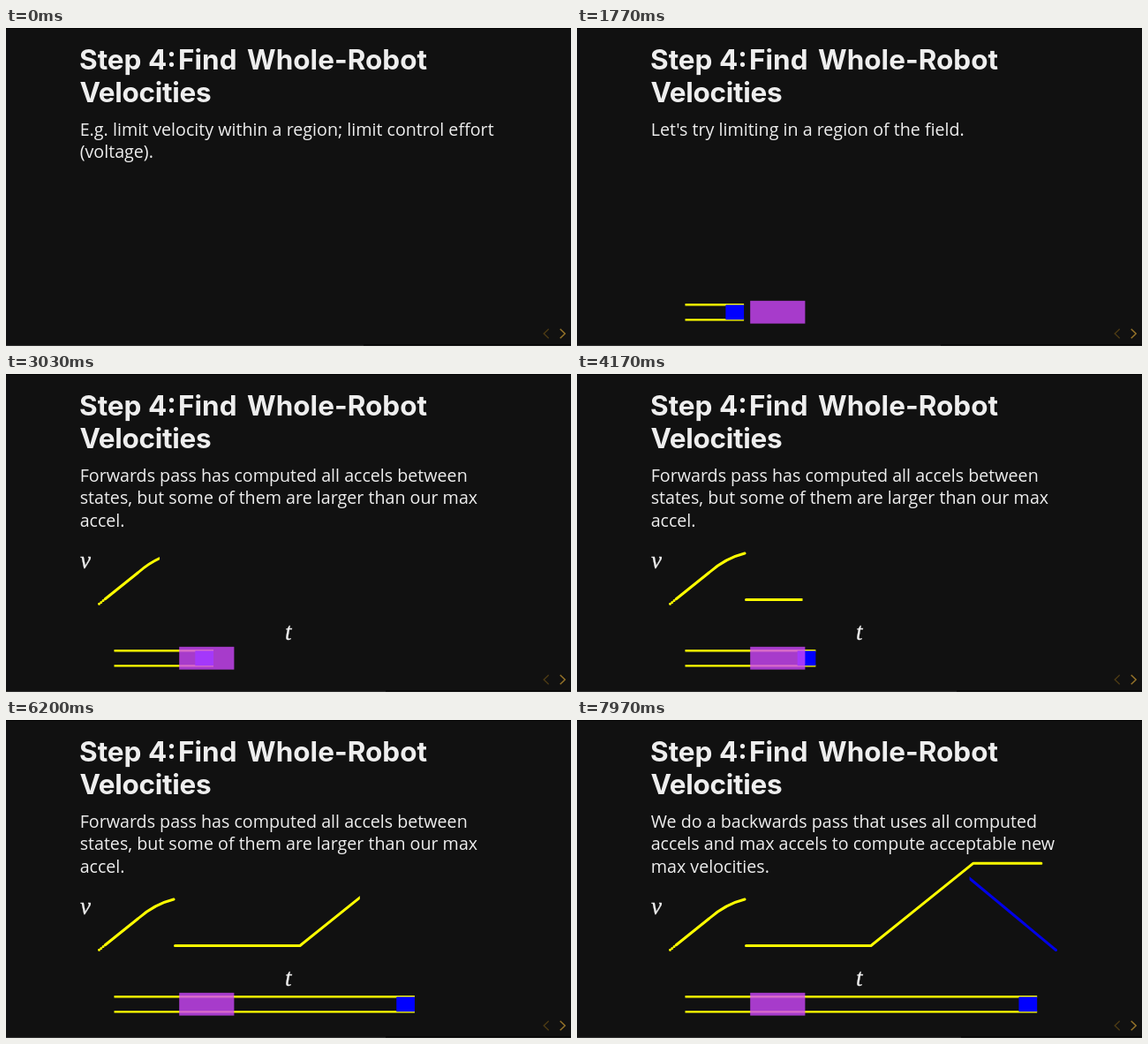
Recreate the animation shown at these times as an HTML page. Size 640 px wide and 360 px high, loop 8000 ms.

```html
<!DOCTYPE html>
<html lang="en">
<head>
<meta charset="utf-8">
<style>
  html, body { margin: 0; width: 100%; height: 100%; overflow: hidden; background: #111; }
  svg { display: block; width: 640px; height: 360px; }
  .title { font: 700 31.5px Inter, sans-serif; fill: #eee; }
  .body { font: 19.66px "Open Sans", sans-serif; fill: #eee; }
  .math { font: italic 27px "Liberation Serif", serif; fill: #eee; stroke: #eee; stroke-width: .3; }
  .sub { font-size: 18px; letter-spacing: 1.2px; }
  .line { fill: none; stroke: #ff0; stroke-width: 3; stroke-linecap: round; stroke-linejoin: round; }
</style>
</head>
<body>
<svg viewBox="0 0 640 360">
  <defs>
    <clipPath id="forwardClip"><rect id="forward" x="100" y="150" height="120"/></clipPath>
    <clipPath id="backwardClip"><rect id="backward" y="150" height="120"/></clipPath>
  </defs>
  <rect width="640" height="360" fill="#111"/>
  <rect width="640" height="1" fill="#050505"/>
  <rect y="359" width="640" height="1" fill="#333"/>
  <rect id="remaining" y="358" width="640" height="1.5" fill="#060606"/>

  <g class="title">
    <text y="47"><tspan x="83">Step</tspan> <tspan x="161">4:</tspan>
      <tspan x="195">Find</tspan> <tspan x="273">Whole-Robot</tspan></text>
    <text x="83.5" y="84" letter-spacing="-.3">Velocities</text>
  </g>

  <g id="slides" class="body"></g>

  <g id="formula" class="math">
    <text x="84" y="148.2" letter-spacing="2">min</text>
    <text x="130" y="148.2" font-style="normal">(</text>
    <text x="139" y="148.2">v</text><text class="sub" x="151.5" y="151.6">usermax</text>
    <text x="224" y="148.2">,</text>
    <text x="235" y="148.2">v</text><text class="sub" x="247" y="151.6">accelmax</text>
    <text x="322.5" y="148.2">,</text>
    <text x="333" y="148.2">v</text><text class="sub" x="345" y="151.6">constraintmax</text>
    <text x="465" y="148.2" font-style="normal">)</text>
    <text class="body" x="474.5" y="148.2" stroke="none">.</text>
  </g>

  <g id="graph">
    <text class="math" x="84" y="219.5">v</text>
    <text class="math" x="316" y="301">t</text>
    <g class="line" clip-path="url(#forwardClip)">
      <path d="M105.5 260.2L150 224.5Q168 208.5 190 203" stroke-dasharray="0 2.9 0 2.9 0 2.9 999"/>
      <path d="M191.5 255.5H333L449 162.2H526"/>
    </g>
    <path class="line" clip-path="url(#backwardClip)" style="stroke:#0000e8" d="M542.5 260.5L440 175.5"/>
  </g>

  <g id="field">
    <path id="tracks" class="line" style="stroke-width:2.4;stroke-linecap:butt"/>
    <rect id="robot" y="313.4" width="20.7" height="16.8" fill="#00f"/>
    <rect x="196.2" y="308.8" width="62.2" height="25.8" fill="#ce47fb" opacity=".8"/>
  </g>

  <g fill="none" stroke-width="1.4">
    <path d="M614.7 340.7L609.2 346L614.7 351.3" stroke="#4c3a14"/>
    <path d="M627.7 340.7L633.2 346L627.7 351.3" stroke="#99762a"/>
  </g>
</svg>
<script>
const LOOP = 8000, FADE = 200;
const slides = [
  { at: -FADE, progress: 405, lines: ["E.g. limit velocity within a region; limit control effort", "(voltage)."] },
  { at: 730, progress: 412, lines: ["Let's try limiting in a region of the field."] },
  { at: 1980, progress: 425, lines: ["Forwards pass. Set the velocity of each state to"] },
  { at: 2800, progress: 430, lines: ["Forwards pass has computed all accels between",
    "states, but some of them are larger than our max", "accel."] },
  { at: 6480, progress: 435, lines: ["We do a backwards pass that uses all computed",
    "accels and max accels to compute acceptable new", "max velocities."] }
];
const $ = id => document.getElementById(id);
const set = (id, name, value) => $(id).setAttribute(name, value);
const clamp = (v, lo, hi) => Math.min(hi, Math.max(lo, v));

$("slides").innerHTML = slides.map(s => "<g>" + s.lines.map((line, i) =>
  `<text x="83.7" y="${121.6 + 25.7 * i}">${line}</text>`).join("") + "</g>").join("");
const slideNodes = [...$("slides").children];

// Robot legs: [start time, acceleration]; velocity accumulates across legs.
const ACCEL = 7.62e-5;
const legs = [[662, ACCEL], [1632, -ACCEL], [2195, 0], [4170, ACCEL], [5600, -ACCEL], [7438, 0]];
function travel(t) {
  let x = 0, v = 0;
  legs.forEach(([start, a], i) => {
    const end = i + 1 < legs.length ? legs[i + 1][0] : start;
    const dt = clamp(t, start, end) - start;
    x += v * dt + a * dt * dt / 2;
    v += a * dt;
  });
  return x;
}

const shown = (t, i) => i < slides.length ? clamp((t - slides[i].at) / FADE, 0, 1) : 0;

function draw(t) {
  slideNodes.forEach((node, i) => node.setAttribute("opacity", shown(t, i) * (1 - shown(t, i + 1))));
  set("formula", "opacity", shown(t, 2) * (1 - shown(t, 3)));
  set("field", "opacity", shown(t, 1));
  set("graph", "opacity", shown(t, 2));

  const progress = slides.reduce((x, s, i) => x + (s.progress - x) * shown(t, i), 0);
  set("remaining", "x", progress);

  const rear = 123 + travel(t), front = rear + 20.7;
  set("robot", "x", rear);
  set("tracks", "d", [313.2, 330.4].map(y =>
    `M122.5 ${y}H${rear}M143.5 ${y}H${front}`).join(""));

  const speed = 0.0716;
  set("forward", "width", Math.max(0, 6.5 + (t - 2090) * speed));
  const back = Math.max(0, (t - 6620) * 0.0725);
  set("backward", "x", 542.5 - back);
  set("backward", "width", back ? back + 3 : 0);
}

function frame() {
  draw(performance.now() % LOOP);
  requestAnimationFrame(frame);
}
frame();
</script>
</body>
</html>
```
